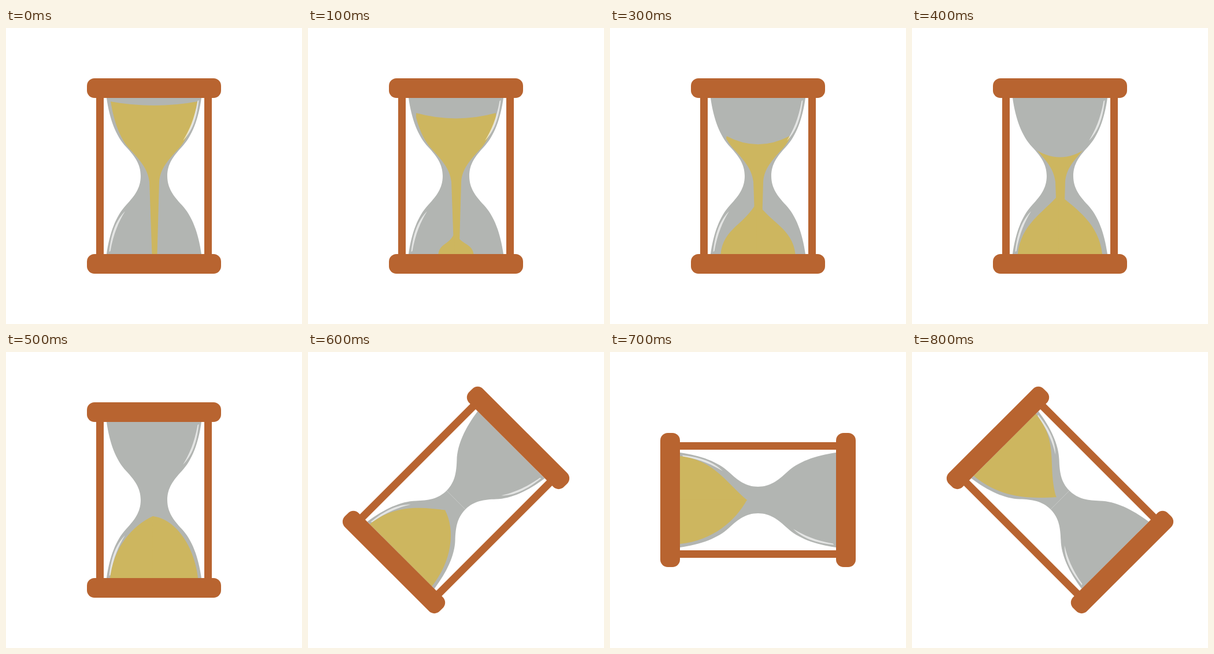
These frames come from a looping animation (512x512 px, 0.9 s). An HTML page with a canvas:

```html
<!DOCTYPE html>
<html lang="en">
<head>
<meta charset="utf-8">
<title>Hourglass</title>
<style>
  html, body { margin: 0; width: 100%; height: 100%; overflow: hidden; background: #fff; }
  canvas { display: block; width: 100%; height: 100%; }
</style>
</head>
<body>
<canvas id="stage" width="512" height="512"></canvas>
<script>
const ctx = document.getElementById('stage').getContext('2d');
const WOOD = '#b86430', GLASS = '#b2b5b2', SAND = '#cdb65f', SHINE = 'rgba(255, 255, 255, 0.65)';
const CENTER = 256, FLOOR = 391;
const STEP = 100, POUR_STEPS = 5, STEPS = 9;

const halfGlass = new Path2D(
  'M174 121 C179 157 190 187 208 206 C222 221 233 235 233 256 H279 C279 235 290 221 304 206 C322 187 333 157 338 121 Z');
const funnel = new Path2D(`M180 121 C186 160 196 188 211 206 C233 230 245 243 248 266
  L252.5 391 H261.5 L265 266 C267 243 279 230 301 206 C316 188 326 160 332 121 Z`);
const shine = new Path2D('M333.5 125 C330 157 322 179 306 195 C317 177 326 157 331.5 126 Z');

function rotate(degrees) {
  ctx.translate(CENTER, CENTER);
  ctx.rotate(degrees * Math.PI / 180);
  ctx.translate(-CENTER, -CENTER);
}

// Fills a shape and its copy turned upside down.
function fillTwice(path, color) {
  ctx.fillStyle = color;
  for (let i = 0; i < 2; i++) {
    ctx.fill(path);
    rotate(180);
  }
}

// The upper sand is the funnel below a sagging surface.
function drawUpperSand(poured) {
  const surface = 127 + 100 * poured, sag = 7 + 12 * poured;
  const edge = 180 + 36 * poured;
  ctx.save();
  ctx.beginPath();
  ctx.moveTo(edge, surface);
  ctx.quadraticCurveTo(CENTER, surface + 2 * sag, 2 * CENTER - edge, surface);
  ctx.lineTo(338, FLOOR);
  ctx.lineTo(174, FLOOR);
  ctx.clip();
  ctx.fill(funnel);
  ctx.restore();
}

// One flank of the heap; a larger bulge makes it rounder.
function drawFlank(footX, apexX, apexY, bulge) {
  const at = (x, y) => [footX + (apexX - footX) * x, FLOOR + (apexY - FLOOR) * y];
  ctx.beginPath();
  ctx.moveTo(footX, FLOOR);
  ctx.bezierCurveTo(...at(0.08, 0.5), ...at(0.95 - 0.5 * bulge, bulge), apexX, apexY);
  ctx.lineTo(apexX + Math.sign(apexX - footX) * 0.5, apexY);
  ctx.lineTo(apexX + Math.sign(apexX - footX) * 0.5, FLOOR);
  ctx.fill();
}

// The heap grows ever slower while pouring, then slides towards the neck as the glass turns.
function drawHeap(poured, turned) {
  const grown = 1 - (1 - poured) ** 2;
  const apexX = 254 + turned;
  const apexY = FLOOR - 107 * grown - 2.2 * turned ** 2;
  const halfWidth = 5 + 71 * grown;
  const roundness = poured ** 2;
  drawFlank(CENTER - halfWidth, apexX, apexY, 0.4 + 0.45 * roundness - 0.08 * turned);
  drawFlank(CENTER + halfWidth, apexX, apexY, 0.4 + 0.55 * roundness - 0.06 * turned);
}

function drawFrame() {
  ctx.fillStyle = WOOD;
  for (const x of [156, 343]) ctx.fillRect(x, 110, 13, 292);
  for (const y of [87, FLOOR]) {
    ctx.beginPath();
    ctx.roundRect(140, y, 232, 34, 13);
    ctx.fill();
  }
}

function draw(step) {
  const poured = Math.min(step / POUR_STEPS, 1);
  const turned = Math.max(step - POUR_STEPS, 0);
  ctx.fillStyle = '#fff';
  ctx.fillRect(0, 0, 512, 512);
  ctx.save();
  rotate(45 * turned);
  fillTwice(halfGlass, GLASS);
  ctx.fillStyle = SAND;
  if (poured < 1) drawUpperSand(poured);
  if (poured > 0) drawHeap(poured, turned);
  fillTwice(shine, SHINE);
  drawFrame();
  ctx.restore();
}

const start = performance.now();
function tick() {
  draw(Math.floor((performance.now() - start) / STEP) % STEPS);
  requestAnimationFrame(tick);
}
tick();
</script>
</body>
</html>
```
